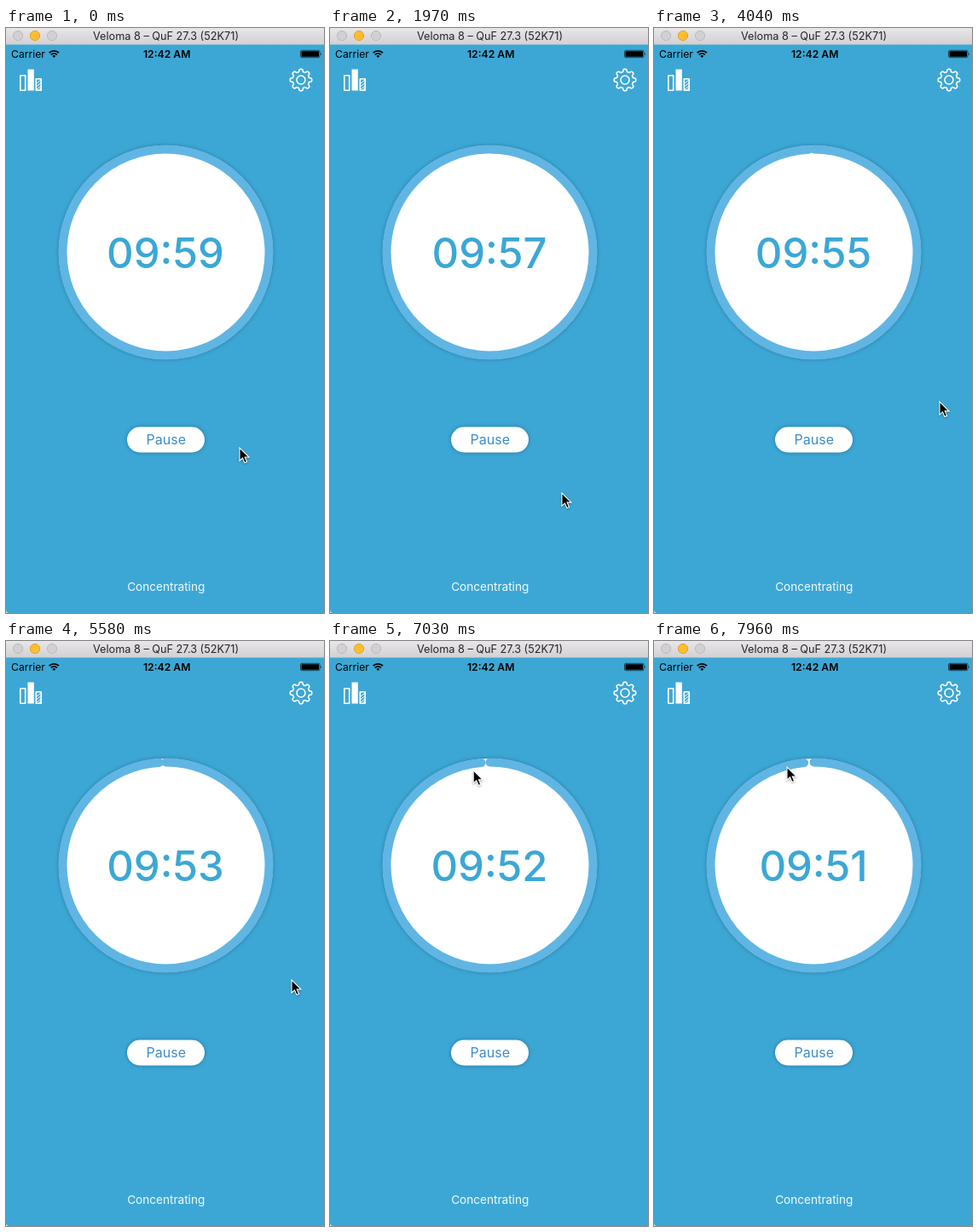
These frames come from a looping animation (373x687 px, 7990 ms). An HTML page:

```html
<!DOCTYPE html>
<html lang="en">
<head>
<meta charset="utf-8">
<title>Focus timer</title>
<style>
  html, body { margin: 0; width: 100%; height: 100%; overflow: hidden; background: #e4e3e4; }
  svg { display: block; width: 373px; height: 687px; font-family: Inter, "Liberation Sans", sans-serif; }
  text { text-anchor: middle; }
  .shadow { filter: drop-shadow(0 0 2.5px rgba(0, 30, 60, .36)); }
  .line { fill: none; stroke: #fff; stroke-width: 1.6; stroke-linejoin: round; }
</style>
</head>
<body>
<svg viewBox="0 0 373 687">
  <defs>
    <linearGradient id="bar" x2="0" y2="1">
      <stop stop-color="#e8e6e8"/><stop offset="1" stop-color="#d2d0d2"/>
    </linearGradient>
  </defs>

  <!-- window -->
  <path d="M0 19H373V687H4Q0 687 0 683Z" fill="#3ca7d5"/>
  <rect width="373" height="19.5" fill="url(#bar)"/>
  <g fill="#d2d0d2" stroke="#bcbabc">
    <circle cx="14" cy="9" r="5.6"/>
    <circle cx="34" cy="9" r="5.6" fill="#fdbe2f" stroke="#e0a32c"/>
    <circle cx="54" cy="9" r="5.6"/>
  </g>
  <text x="187.5" y="14" font-size="12.7" fill="#262526">Veloma 8 – QuF 27.3 (52K71)</text>

  <!-- status bar -->
  <text x="26" y="35" font-size="12.2">Carrier</text>
  <g fill="none" stroke="#000" stroke-width="1.7">
    <path d="M50.6 29.2a8 8 0 0 1 11.4 0M52.7 31.5a5 5 0 0 1 7.2 0"/>
    <path d="M56.3 35l-2-2.1a3 3 0 0 1 4 0z" fill="#000" stroke="none"/>
  </g>
  <text x="188.7" y="35" font-size="12.2" font-weight="600">12:42 AM</text>
  <rect x="345.5" y="26.3" width="22.5" height="8.4" rx="1.6" fill="none" stroke="#000" stroke-width=".6"/>
  <rect x="346.5" y="27.3" width="20.5" height="6.4" rx=".6"/>
  <path d="M369 29q1.5 1.5 0 3z"/>

  <!-- toolbar -->
  <g class="line">
    <path d="M16.8 55.8h5.9v17.4h-5.9zM35.3 59.8h5.9v13.4h-5.9z"/>
    <path d="M25.5 48.5h7.3v25h-7.3z" fill="#fff" stroke="none"/>
    <path d="M36 65l5-4M36 68.5l5-4M36 72l5-4M38 73l3-2.5" stroke-width="1"/>
    <path id="gear"/>
    <circle cx="346" cy="61" r="5"/>
  </g>

  <!-- timer -->
  <circle class="shadow" cx="187.5" cy="263.5" r="125.6" fill="#fff"/>
  <circle id="ring" cx="187.5" cy="263.5" r="121" pathLength="600" transform="rotate(-90 187.5 263.5)"
    fill="none" stroke="#60b5e3" stroke-width="10" stroke-linecap="round"/>
  <text id="clock" x="187" y="281.5" font-size="49" font-weight="500" fill="#3ca7d5"></text>

  <rect class="shadow" x="142" y="468.5" width="91" height="30" rx="15" fill="#fff"/>
  <text x="187.8" y="489.2" font-size="16" fill="#3d8cc8">Pause</text>
  <text x="187.7" y="661.2" font-size="13.6" fill="#f4fafd">Concentrating</text>

  <path id="cursor" d="M0 0V15.2L3.5 12L6 17.6L8.6 16.5L6.2 11H11Z" stroke="#fff" stroke-width="1.1"
    style="filter: drop-shadow(0 1px 1px rgba(0, 0, 0, .35))"/>
</svg>
<script>
const $ = id => document.getElementById(id);
const LOOP = 7990, FIRST_TICK = 617, TICK_MS = 992, RING_MS = 240;

// turning points of the pointer: time, x, y
const STOPS = [
  [620, 274, 493], [800, 277, 484], [1510, 277, 484], [1970, 272, 546], [2600, 234, 656],
  [3310, 237, 655], [4040, 335, 439], [4310, 335, 398], [6170, 335, 398],
  [7030, 168, 152], [7400, 235, 117], [7750, 242, 151], [7960, 156, 148]
];

const clamp = v => Math.max(0, Math.min(1, v));
const ease = k => k * k * (3 - 2 * k);

function gearPath() {
  const points = Array.from({ length: 160 }, (_, i) => {
    const a = i * Math.PI / 80;
    const r = 11.2 + 1.5 * Math.tanh(2.5 * Math.cos(8 * a));
    return [346 + r * Math.cos(a), 61 + r * Math.sin(a)];
  });
  return "M" + points.join("L") + "Z";
}

function pointerAt(t) {
  let [time, x, y] = STOPS[0];
  for (const [nextTime, nextX, nextY] of STOPS.slice(1)) {
    const k = clamp((t - time) / (nextTime - time));
    x += (nextX - x) * k;
    y += (nextY - y) * k;
    time = nextTime;
  }
  return [x, y];
}

function draw(t) {
  const ticks = (t - FIRST_TICK) / TICK_MS + 1;
  const passed = Math.floor(ticks);
  const turn = passed ? ease(clamp((ticks - passed) * TICK_MS / RING_MS)) : 1;
  $("clock").textContent = "09:" + (59 - passed);
  $("ring").setAttribute("stroke-dasharray", `${600 - passed - turn} 600`);
  $("cursor").setAttribute("transform", `translate(${pointerAt(t)})`);
}

function frame() {
  draw(performance.now() % LOOP);
  requestAnimationFrame(frame);
}

$("gear").setAttribute("d", gearPath());
frame();
</script>
</body>
</html>
```
